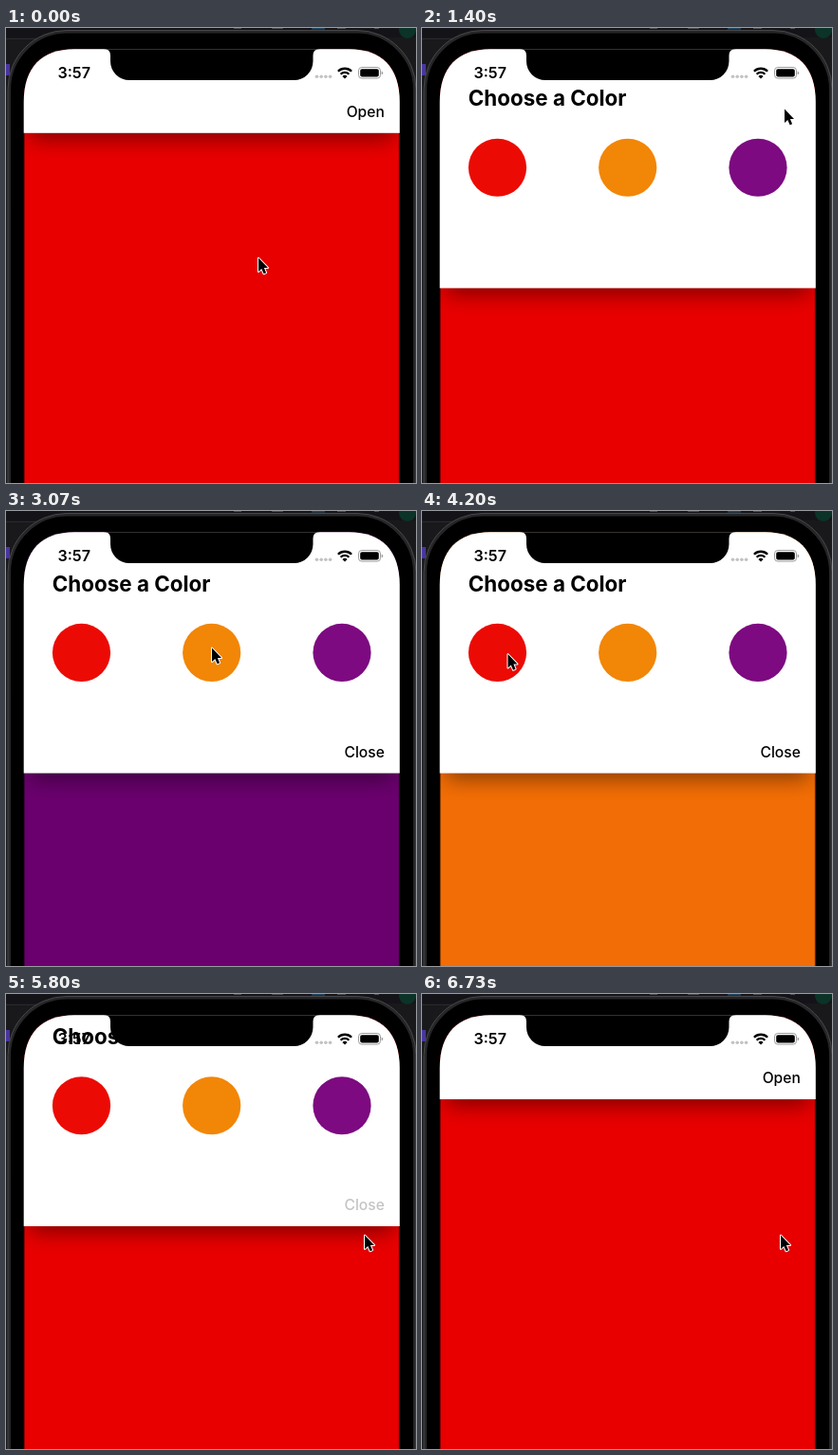
An HTML page that plays this animation: 432x480 px, repeating every 7270 ms.

```html
<!DOCTYPE html>
<html lang="en">
<head>
<meta charset="utf-8">
<title>Choose a Color</title>
<style>
  html, body { margin: 0; width: 100%; height: 100%; overflow: hidden; background: #17171a; }
  svg { display: block; width: 432px; height: 480px; }
  text { font-family: Inter, Roboto, sans-serif; fill: #000; }
  .clock { font-size: 16.1px; font-weight: 600; }
  .title { font-size: 22.4px; font-weight: 700; }
  .button { font-size: 15.6px; font-weight: 550; text-anchor: end; }
</style>
</head>
<body>
<svg viewBox="0 0 432 480">
  <defs>
    <clipPath id="screen">
      <path d="M18.7 500V78C18.7 41.3 38 22.3 72 22.3H361.5C395.5 22.3 414.8 41.3 414.8 78V500Z"/>
    </clipPath>
    <filter id="blur" filterUnits="userSpaceOnUse" x="-40" y="-400" width="512" height="470">
      <feGaussianBlur stdDeviation="11"/>
    </filter>
  </defs>

  <!-- desktop behind the phone -->
  <rect width="432" height="480" fill="#19191c"/>
  <path d="M0 0H432V10H0Z" fill="#141418"/>
  <path d="M0 11.5H60" stroke="#29292d"/>
  <path d="M0 38H4V50H0Z" fill="#4a34a0"/>
  <path d="M240 0h8M280 0h12M349 0h9M388 0h5" stroke="#4c4c50" stroke-width="2"/>
  <path d="M322 0h14" stroke="#234660" stroke-width="3"/>
  <circle cx="423" cy="2" r="9" fill="#0b3327"/>

  <!-- phone body -->
  <rect x="3.5" y="4" width="427" height="600" rx="61" fill="#000" stroke="#262628" stroke-width="3"/>
  <rect x="2" y="2.5" width="430" height="600" rx="62" fill="none" stroke="#48484a"/>

  <g clip-path="url(#screen)">
    <rect id="page" x="18.7" y="0" width="396.1" height="500" stroke="#000" stroke-opacity=".5" stroke-width="2"/>
    <g id="panel">
      <rect x="26" y="-340" width="381.5" height="346" opacity=".45" filter="url(#blur)"/>
      <rect x="18" y="-340" width="398" height="340" fill="#fff"/>
      <text class="title" x="48.8" y="-192">Choose a Color</text>
      <circle cx="79.5" cy="-127.2" r="30.6" fill="#eb0b04"/>
      <circle cx="216.7" cy="-127.2" r="30.6" fill="#f28607"/>
      <circle cx="354" cy="-127.2" r="30.6" fill="#7d0a80"/>
      <text class="button" id="open" x="398.8" y="-17">Open</text>
      <text class="button" id="close" x="398.8" y="-17">Close</text>
    </g>
    <path d="M103 20V22Q110 22 110 29V35A20 20 0 0 0 130 55H303.5A20 20 0 0 0 323.5 35V29Q323.5 22 331 22V20Z"/>
  </g>

  <!-- status bar -->
  <text class="clock" x="54.5" y="53.3">3:57</text>
  <g fill="#c2c2c4">
    <circle cx="327.5" cy="51.3" r="1.8"/><circle cx="332.2" cy="51.3" r="1.8"/>
    <circle cx="336.9" cy="51.3" r="1.8"/><circle cx="341.6" cy="51.3" r="1.8"/>
  </g>
  <path d="M349.9 45.7a10 10 0 0 1 14.2 0M352.6 48.7a6.3 6.3 0 0 1 8.8 0" fill="none" stroke="#000" stroke-width="2.3"/>
  <path d="M357 53.6L354.4 51A3.7 3.7 0 0 1 359.6 51Z"/>
  <rect x="371.5" y="41.5" width="23" height="11.6" rx="3.4" fill="none" stroke="#9c9c9e"/>
  <rect x="373.2" y="43.2" width="19.6" height="8.2" rx="1.9"/>
  <path d="M395.6 45.5q1.6 .4 1.6 1.9t-1.6 1.9Z" fill="#9c9c9e"/>

  <path id="cursor" d="M1 1.6V16L4.3 13L6.6 18.3L9.1 17.2L6.9 12H11Z"
        stroke="#fff" stroke-width="2" stroke-linejoin="round" paint-order="stroke"/>
</svg>

<script>
  const LOOP = 7270, STEP = 1000 / 15;
  const CLOSED = 110.8, OPENED = 276.6;
  const RED = '#e80000', PURPLE = '#6a006d', ORANGE = '#f26d05';
  const el = id => document.getElementById(id);
  const [page, panel, openLabel, closeLabel, cursor] =
    ['page', 'panel', 'open', 'close', 'cursor'].map(el);

  const ramp = (t, a, b) => Math.min(1, Math.max(0, (t - a) / (b - a)));
  const ease = p => p * p * (3 - 2 * p);

  // critically damped spring, 0 to 1
  const spring = (t, start, rate) => {
    const x = Math.max(0, t - start) / 1000 * rate;
    return 1 - (1 + x) * Math.exp(-x);
  };

  // start, end, and the from / bend / to points of each pointer move
  const moves = [
    [5, 670, [265, 241], [318, 150], [381, 84]],
    [1470, 2130, [381, 84], [380, 125], [362, 152]],
    [2465, 3070, [362, 152], [290, 110], [216, 143]],
    [3405, 4070, [216, 143], [150, 152], [89.5, 149.5]],
    [4335, 5345, [89.5, 149.5], [225, 205], [377, 253]]
  ];

  function pointer(t) {
    const [start, end, a, b, c] = moves.filter((m, i) => !i || t >= m[0]).pop();
    const p = ease(ramp(t, start, end)), q = 1 - p;
    return a.map((v, i) => q * q * v + 2 * p * q * b[i] + p * p * c[i]);
  }

  function pageColor(t) {
    if (t < 2260 || t >= 4390) return RED;
    return t < 3260 ? PURPLE : ORANGE;
  }

  const DIM = 0.23;
  function openAlpha(t) {
    if (t < 660) return 1;
    return t < 3000 ? DIM * (1 - ramp(t, 950, 1300)) : ramp(t, 6280, 6620);
  }
  function closeAlpha(t) {
    return t < 5590 ? ramp(t, 1420, 1600) : DIM * (1 - ramp(t, 5900, 6200));
  }

  function render(t) {
    const shown = spring(t, 740, 9.6) - spring(t, 5706, 8.5);
    panel.setAttribute('transform', `translate(0 ${CLOSED + (OPENED - CLOSED) * shown})`);
    page.setAttribute('fill', pageColor(t));
    openLabel.setAttribute('opacity', openAlpha(t));
    closeLabel.setAttribute('opacity', closeAlpha(t));
    cursor.setAttribute('transform', `translate(${pointer(t)})`);
  }

  // the screen refreshes 15 times a second
  function tick() {
    const t = performance.now() % LOOP;
    render(Math.floor((t + 4) / STEP) * STEP);
    requestAnimationFrame(tick);
  }
  tick();
</script>
</body>
</html>
```
